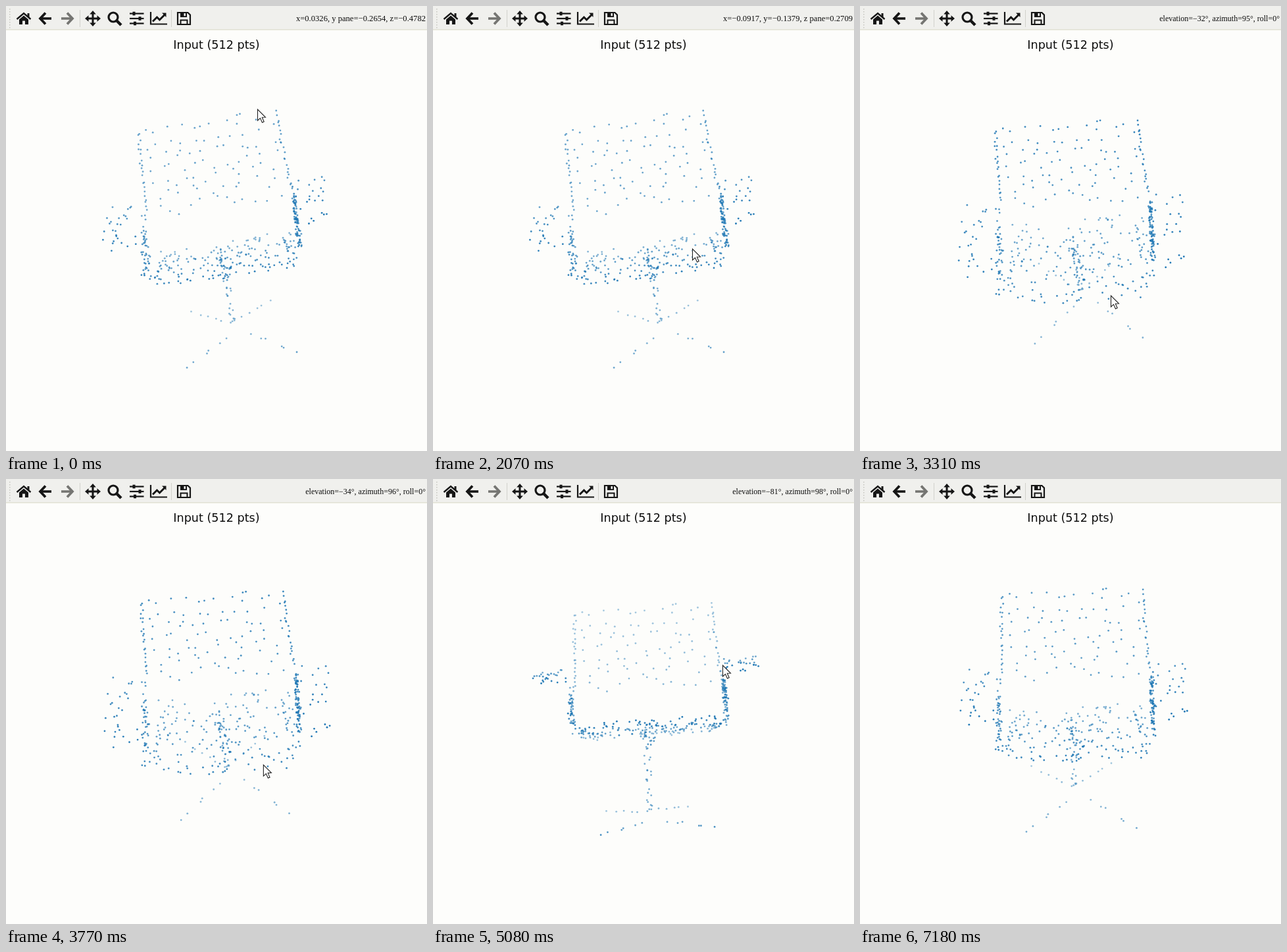
Animation, 640 px wide and 676 px high, one loop 7.21 s. Source, as an HTML page with a canvas:

```html
<!DOCTYPE html>
<html lang="en">
<head>
<meta charset="utf-8">
<title>Point cloud viewer</title>
<style>
html, body { margin: 0; width: 100%; height: 100%; overflow: hidden; background: #fdfdfb; }
canvas { display: block; }
</style>
</head>
<body>
<canvas id="stage" width="640" height="676"></canvas>
<script>
const ctx = document.getElementById('stage').getContext('2d');
const LOOP = 7210, CX = 328, CY = 345, DIST = 3200, LAG = 100;
const INK = '#161616', PAPER = '#fdfdfb', BAR = '#f0f0ed';

let seed = 123457;
const rnd = () => (seed = (seed * 48271) % 2147483647) / 2147483647;
const mix = (a, b, k) => a + (b - a) * k;
const span = (a, b) => mix(a, b, rnd());
const repeat = (n, fn) => { for (let i = 0; i < n; i++) fn(i); };

// Chair as points: u to the right, y up, z away from the viewer
const points = [];
const add = (u, y, z, j = 0) =>
  points.push([u, y, z].map(c => c + span(-j, j)));
const line = (n, a, b, j) => repeat(n, i => {
  const k = (i + rnd()) / n;
  add(...a.map((c, axis) => mix(c, b[axis], k)), j);
});

function buildChair() {
  // leaning backrest, spread over a loose grid
  repeat(84, i => {
    const u = -102 + 17 * (i % 12 + rnd()), v = (Math.floor(i / 12) + rnd()) / 6.8;
    add(u, 20 + 124 * v, 38 + 70 * v);
  });
  // seat, front to back
  repeat(145, () => {
    const w = rnd();
    add(span(-104, 104), -4 - 51 * w, -121 + 183 * w, 5);
  });
  // mechanism and column
  line(22, [-14, -38, 20], [2, -46, -50], 8);
  line(24, [-8, -50, 10], [-10, -159, -8], 6);

  for (const side of [-1, 1]) {
    line(22, [side * 106, 140, 104], [side * 113, 30, 43], 2.5);
    line(16, [side * 108, -12, -95], [side * 94, -48, 40], 7);
    // arm support: a triangle standing beside the seat
    repeat(side < 0 ? 44 : 80, () => {
      const r = rnd() ** 0.65, s = rnd();
      add(side * 116 + span(-3, 3),
        mix(34, mix(16, -38, s), r),
        mix(34, mix(-120, 0, s), r));
    });
    repeat(27, () => add(side * span(118, 168), span(58, 66), span(-106, 27)));
    line(6, [side * 14, -175, -18], [side * 91, -174, -95], 2);
    line(6, [-12, -160, -8], [side * 69 - 16, -171, 58], 2);
  }
}
buildChair();

// time, pointer x, pointer y, elevation below the horizon, azimuth
const keys = [
  [0, 382, 157, 58, 99.7], [2070, 394, 369, 58, 99.7],
  [3210, 380, 441, 32, 95.4], [3310, 381, 440, 32, 96.3],
  [4410, 407, 425, 39, 96.7], [4980, 435, 285, 81, 97.6],
  [5080, 440, 283, 81, 94], [5740, 496, 298, 79, 78],
  [6300, 450, 400, 49, 92.5], [6600, 670, 430, 49, 92.5],
  [LOOP, 670, 430, 49, 92.5]];

function stateAt(t) {
  const i = keys.findIndex(k => k[0] > t), a = keys[i - 1], b = keys[i];
  const k = (t - a[0]) / (b[0] - a[0]), e = k * k * (3 - 2 * k);
  const [, x, y, elev, azim] = a.map((c, n) => mix(c, b[n], e));
  return { x, y, elev, azim };
}

function path(coords, { fill, stroke, width = 2, close } = {}) {
  ctx.beginPath();
  for (let i = 0; i < coords.length; i += 2) ctx.lineTo(coords[i], coords[i + 1]);
  if (close || fill) ctx.closePath();
  if (fill) { ctx.fillStyle = fill; ctx.fill(); }
  if (stroke) { ctx.strokeStyle = stroke; ctx.lineWidth = width; ctx.stroke(); }
}
const rect = (x, y, w, h, color) => { ctx.fillStyle = color; ctx.fillRect(x, y, w, h); };
const ink = (coords, width) => path(coords, { stroke: INK, width });
const solid = coords => path(coords, { fill: INK });

function text(str, x, y, font, align) {
  ctx.font = font;
  ctx.textAlign = align;
  ctx.fillStyle = '#0c0c0c';
  ctx.fillText(str, x, y);
}

function arrow(tip, dir, color) {
  const tail = tip + 18 * dir, wing = tip + 9 * dir;
  path([tail, 19, tip + 2 * dir, 19], { stroke: color, width: 3.6 });
  path([wing, 10.5, tip + dir, 19, wing, 27.5], { stroke: color, width: 3.8 });
}

function toolbar() {
  rect(0, 0, 640, 36, BAR);
  rect(0, 35.5, 640, 1, '#d8d8c4');
  for (let y = 4; y < 34; y += 4) rect(5, y, 1.5, 1.5, '#c6c6c0');
  for (const x of [112, 251]) rect(x, 6, 1, 26, '#d2d2cc');

  // home
  ink([16.5, 20, 27, 11, 37.5, 20], 2.4);
  rect(32.5, 11, 3, 6, INK);
  solid([20, 20.5, 27, 14.5, 34, 20.5, 34, 28, 29, 28, 29, 22.5, 25, 22.5, 25, 28, 20, 28]);

  arrow(51, 1, INK);
  arrow(102, -1, '#757572');

  // pan
  ctx.save();
  ctx.translate(132, 19);
  repeat(4, () => {
    ink([0, 0, 0, -8], 3);
    solid([0, -12, 4.8, -6.5, -4.8, -6.5]);
    ctx.rotate(Math.PI / 2);
  });
  ctx.restore();

  // zoom
  ctx.beginPath();
  ctx.arc(163, 17, 7, 0, 7);
  ctx.strokeStyle = INK;
  ctx.lineWidth = 3.2;
  ctx.stroke();
  ink([168, 22, 175, 29], 4.4);

  // sliders
  [194.5, 203.5, 196].forEach((x, i) => {
    const y = 11.5 + 7.5 * i;
    rect(188, y - 1.1, 21.5, 2.2, INK);
    rect(x - 2, y - 2.8, 4, 5.6, INK);
  });

  // chart
  ink([220, 9, 220, 27.5, 245, 27.5], 2.2);
  ink([223, 23.5, 229.5, 17, 233.5, 21, 241, 13.5], 3);
  solid([237, 10.5, 243.5, 10.5, 243.5, 17]);

  // save
  path([261, 10, 276.5, 10, 280, 13.5, 280, 28, 261, 28], { stroke: INK, width: 2.2, close: true });
  rect(265, 10, 10, 7, INK);
  rect(270.5, 11, 2.5, 4.2, BAR);
  ink([265.5, 28, 265.5, 21.5, 275.5, 21.5, 275.5, 28], 2);
}

const signed = (n, d) => (n < 0 ? '\u2212' : '') + Math.abs(n).toFixed(d);

function status(t) {
  if (t >= 6450) return;
  const right = (str, size) => text(str, 638, 23, `${size}px "Liberation Serif", serif`, 'right');
  if (t < 2240) {
    const k = Math.min(1, (stateAt(t).y - 157) / 212), late = k > 0.5;
    const x = mix(0.0326, -0.0917, k), y = mix(-0.2654, -0.1379, k), z = mix(-0.4782, 0.2709, k);
    right(`x=${signed(x, 4)}, y${late ? '' : ' pane'}=${signed(y, 4)}, z${late ? ' pane' : ''}=${signed(z, 4)}`, 12.6);
  } else {
    const s = stateAt(t - LAG);
    right(`elevation=${signed(-s.elev, 0)}°, azimuth=${s.azim.toFixed(0)}°, roll=0°`, 12);
  }
}

// Nearer points are more opaque
function cloud({ elev, azim }) {
  const rad = Math.PI / 180;
  const sE = Math.sin(elev * rad), cE = Math.cos(elev * rad);
  const sA = Math.sin(azim * rad), cA = Math.cos(azim * rad);
  const turned = points.map(([u, y, z]) => {
    const along = y * sA - u * cA;
    return { x: u * sA + y * cA, y: sE * along + cE * z, depth: cE * along - sE * z };
  });
  const depths = turned.map(p => p.depth);
  const far = Math.min(...depths), near = Math.max(...depths);
  for (const { x, y, depth } of turned) {
    const scale = DIST / (DIST - depth);
    ctx.fillStyle = `rgba(31,119,180,${mix(0.4, 1, (depth - far) / (near - far))})`;
    ctx.beginPath();
    ctx.arc(CX + x * scale, CY - y * scale, 1.4, 0, 7);
    ctx.fill();
  }
}

function pointer({ x, y }) {
  ctx.save();
  ctx.translate(x + 0.5, y);
  path([0, 0, 0, 17, 4, 13.3, 7, 20, 9.7, 18.8, 6.8, 12.3, 12, 12],
    { fill: '#fff', stroke: '#222', width: 1.1 });
  ctx.restore();
}

function draw(now) {
  const t = now % LOOP, s = stateAt(t);
  rect(0, 0, 640, 676, PAPER);
  toolbar();
  status(t);
  text('Input (512 pts)', 320, 65, '17.6px "DejaVu Sans", sans-serif', 'center');
  cloud(s);
  pointer(s);
}

const start = performance.now();
function tick() {
  draw(performance.now() - start);
  requestAnimationFrame(tick);
}
tick();
</script>
</body>
</html>
```
